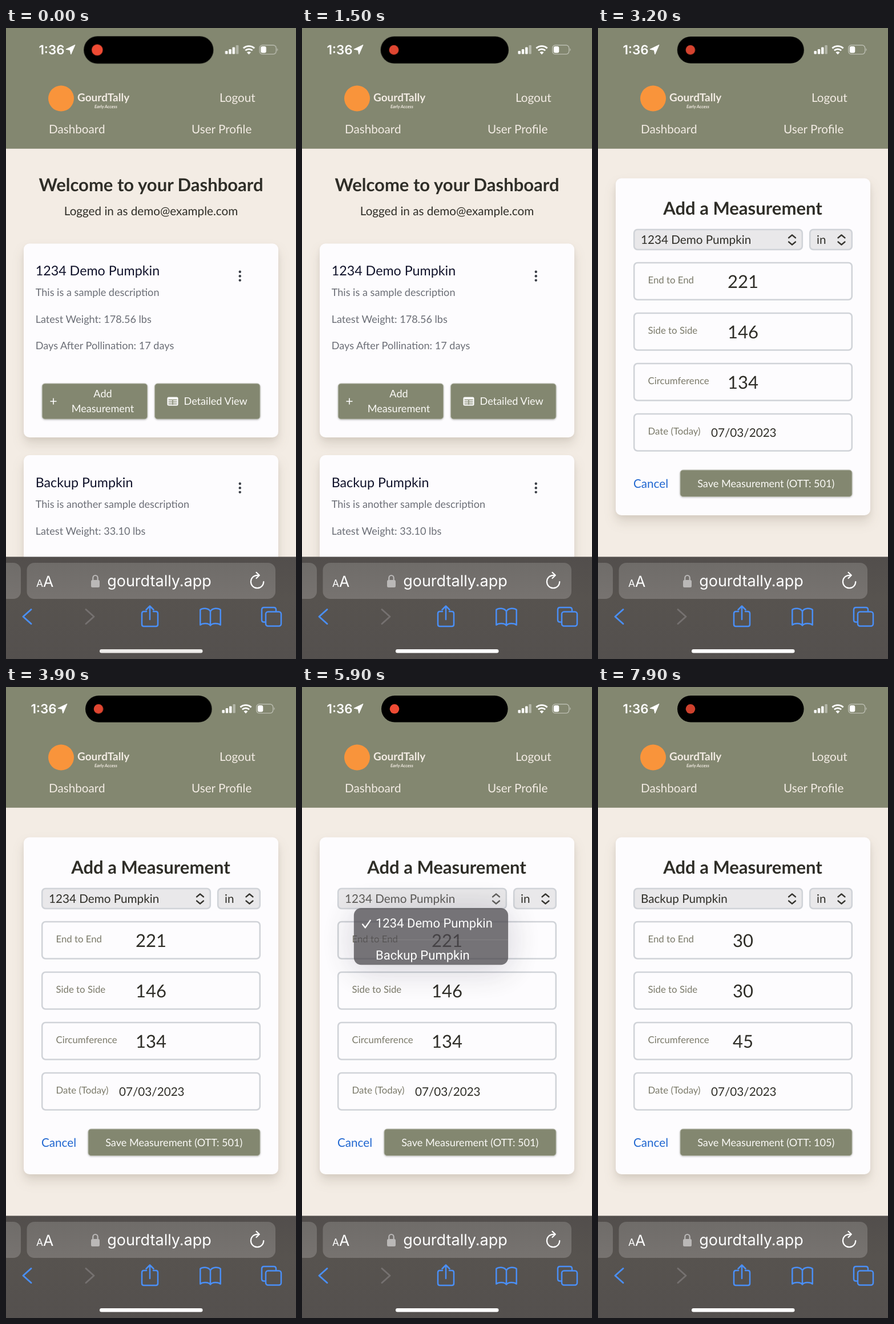
Animation of 508x1102 px, one loop 8 s. Source, as an HTML page:

```html
<!DOCTYPE html>
<html lang="en">
<head>
<meta charset="utf-8">
<title>Dashboard demo</title>
<style>
html, body { margin: 0; width: 100%; height: 100%; overflow: hidden; background: #f3ece4; }
.stage { position: relative; width: 508px; height: 1102px; overflow: hidden; text-rendering: geometricPrecision; }
svg { position: absolute; left: 0; top: 0; display: block; }
text { font-family: Lato, sans-serif; font-size: 20.68px; fill: #2f2e28; white-space: pre; text-rendering: geometricPrecision; }
.mid { text-anchor: middle; }
.h1 { font-size: 31.02px; font-weight: 700; }
.h2 { font-size: 23.27px; fill: #10122a; }
.sm { font-size: 18.1px; fill: #6b6e76; }
.label { font-size: 16.8px; fill: #7b7a6a; }
.num { font-size: 31.02px; text-anchor: middle; }
.nav { fill: #f3ece4; }
.btn { font-size: 18.1px; fill: #fbfaf6; }
.sys, .sys text { font-family: Inter, sans-serif; fill: #fff; }
.card { fill: #fdfcfe; filter: drop-shadow(0 12px 10px rgba(70,55,30,.13)) drop-shadow(0 3px 4px rgba(70,55,30,.06)); }
.key { fill: #838770; stroke: #b4b7a8; stroke-width: 1; filter: drop-shadow(0 1.5px 1.5px rgba(0,0,0,.24)); }
.field { fill: none; stroke: #d0d3d8; stroke-width: 2.6; }
.pick { fill: #e9e8ea; }
.line { fill: none; stroke-linecap: round; stroke-linejoin: round; }

/* every timeline shares one 8 s cycle */
.dash, .form, .old, .new, .row2, .clock, .icons, .island, .rec, .dot, .bar, .home, .menu, .sel {
  animation: 8s linear infinite;
}
.dash { animation-name: leave; animation-timing-function: step-end; }
.form { animation-name: enter; animation-timing-function: step-end; }
.old { animation-name: before; animation-timing-function: step-end; }
.new { animation-name: after; animation-timing-function: step-end; }
.row2 { animation-name: press; animation-timing-function: step-end; }
.clock { animation-name: clock; animation-timing-function: ease-out; }
.icons { animation-name: icons; animation-timing-function: ease-out; }
.island { animation-name: shrink; transform-origin: 249.8px 38.3px; }
.rec { animation-name: settle; animation-timing-function: ease-out; transform-origin: 162px 38.3px; }
.dot { animation-name: pulse; animation-timing-function: ease-in-out; }
.bar { animation-name: bar; }
.home { animation-name: home; }
.sel { animation-name: dim; }

@keyframes leave { 0% { opacity: 1 } 38.75%, 100% { opacity: 0 } }
@keyframes enter { 0% { opacity: 0 } 38.75%, 100% { opacity: 1 } }
@keyframes before { 0% { opacity: 1 } 86.25%, 100% { opacity: 0 } }
@keyframes after { 0% { opacity: 0 } 86.25%, 100% { opacity: 1 } }
@keyframes press { 0% { background: transparent } 81.25% { background: #6b696d } 85%, 100% { background: transparent } }
@keyframes clock { 0% { transform: translateX(14px) } 5%, 100% { transform: none } }
@keyframes icons { 0% { transform: translateX(5.5px) } 5%, 100% { transform: none } }
@keyframes shrink {
  0% { transform: scale(1.025) } 8.75% { transform: scale(1.017) }
  30% { transform: scale(1.006) } 44%, 100% { transform: none }
}
@keyframes settle { 0% { transform: scale(1.15) } 5%, 100% { transform: none } }
@keyframes pulse {
  0%, 15%, 30%, 45%, 60%, 75%, 90% { opacity: 1 }
  7.5%, 22.5%, 37.5%, 52.5%, 67.5%, 82.5%, 97.5%, 100% { opacity: .86 }
}
@keyframes bar { 0%, 2.4% { opacity: 0 } 3.75%, 13% { opacity: 1 } 17%, 100% { opacity: 0 } }
@keyframes home { 0% { fill: #eeecea } 4%, 100% { fill: #fff } }
@keyframes dim { 0%, 71.9% { opacity: 1 } 73.75%, 85% { opacity: .75 } 88%, 100% { opacity: 1 } }
@keyframes open {
  0%, 71.9% { transform: scale(.4); height: 60px; opacity: 0 }
  73.75% { transform: scale(.846); height: 117px; opacity: .8 }
  75% { transform: scale(.97); height: 128px; opacity: .96 }
  77%, 85% { transform: none; height: 130px; opacity: 1 }
  86.5% { transform: scale(.85); height: 112px; opacity: .6 }
  88.5%, 100% { transform: scale(.5); height: 70px; opacity: 0 }
}
.menu {
  position: absolute; left: 69px; top: 386px; width: 319px; height: 130px;
  border-radius: 15px; overflow: hidden; transform-origin: 143px 0;
  background: rgba(76,74,78,.965); box-shadow: 0 8px 70px rgba(30,25,45,.24);
  color: #fff; font: 26px/65px Roboto, sans-serif; animation-name: open;
}
.menu div { box-sizing: border-box; height: 65px; padding-left: 45px; white-space: nowrap; }
.menu .row2 { border-top: 1px solid rgba(255,255,255,.1); }
</style>
</head>
<body>
<div class="stage">
<svg width="508" height="1102" viewBox="0 0 508 1102">
  <defs>
    <linearGradient id="dock" x2="0" y2="1">
      <stop stop-color="#524e4c"/><stop offset=".4" stop-color="#57534f"/><stop offset="1" stop-color="#54504e"/>
    </linearGradient>
    <linearGradient id="glass" x2="0" y2="1">
      <stop stop-color="#6f6c69"/><stop offset="1" stop-color="#777370"/>
    </linearGradient>
    <g id="dots" fill="#3a3e46">
      <circle cx="409.8" cy="425.8" r="2.2"/><circle cx="409.8" cy="433.2" r="2.2"/><circle cx="409.8" cy="440.6" r="2.2"/>
    </g>
    <path id="sort" class="line" stroke="#35342f" stroke-width="2.3" d="M-6-3.5 0-8.5 6-3.5M-6 3.5 0 8.5 6 3.5"/>
    <rect id="box" class="field" x="63.2" y="410" width="381.6" height="64.5" rx="6"/>
  </defs>

  <rect width="508" height="1102" fill="#f3ece4"/>
  <rect width="508" height="210.8" fill="#838770"/>
  <circle cx="96.5" cy="123" r="22.5" fill="#f9943b"/>
  <text x="125" y="128" class="nav" style="font-size:19px;font-weight:700">GourdTally</text>
  <text x="155" y="140" class="nav" style="font-size:7.8px;font-weight:700;font-style:italic">Early Access</text>
  <text x="374" y="129" class="nav">Logout</text>
  <text x="75" y="183.5" class="nav">Dashboard</text>
  <text x="325" y="183.5" class="nav">User Profile</text>

  <g class="dash">
    <text x="254" y="284.5" class="h1 mid">Welcome to your Dashboard</text>
    <text x="254" y="327" class="mid">Logged in as demo@example.com</text>
    <rect class="card" x="31" y="376.5" width="446" height="338.5" rx="10"/>
    <text x="51.7" y="432" class="h2">1234 Demo Pumpkin</text>
    <use href="#dots"/>
    <text x="51.7" y="468" class="sm">This is a sample description</text>
    <text x="51.7" y="514.5" class="sm">Latest Weight: 178.56 lbs</text>
    <text x="51.7" y="561" class="sm">Days After Pollination: 17 days</text>
    <rect class="key" x="63.3" y="621" width="184.4" height="62" rx="5"/>
    <rect class="key" x="260.6" y="621" width="184.4" height="62" rx="5"/>
    <path d="M77.5 652h11M83 646.5v11" stroke="#fff" stroke-width="1.6"/>
    <text x="169.5" y="645" class="btn mid">Add</text>
    <text x="169.5" y="671" class="btn mid">Measurement</text>
    <rect x="282.5" y="644.5" width="19" height="15" rx="2.5" fill="#fff"/>
    <path d="M284.5 649.5h15M284.5 653h15M284.5 656.5h15M292 649v9" stroke="#838770" stroke-width="1.4"/>
    <text x="311.5" y="658" class="btn">Detailed View</text>

    <rect class="card" x="31" y="746" width="446" height="338" rx="10"/>
    <text x="51.7" y="802" class="h2">Backup Pumpkin</text>
    <use href="#dots" y="370"/>
    <text x="51.7" y="838" class="sm">This is another sample description</text>
    <text x="51.7" y="884.5" class="sm">Latest Weight: 33.10 lbs</text>
  </g>

  <g class="form">
    <rect class="card" x="31" y="262.5" width="446" height="588.5" rx="10"/>
    <text x="253.5" y="325.5" class="h1 mid">Add a Measurement</text>
    <rect class="field pick" x="63.2" y="352" width="294.6" height="35" rx="6"/>
    <rect class="field pick" x="371.2" y="352" width="73.6" height="35" rx="6"/>
    <g class="sel">
      <text x="75" y="377" class="old">1234 Demo Pumpkin</text>
      <text x="75" y="377" class="new">Backup Pumpkin</text>
      <use href="#sort" x="340" y="370"/>
    </g>
    <text x="383" y="377">in</text>
    <use href="#sort" x="426.5" y="370"/>
    <use href="#box"/><use href="#box" y="88"/><use href="#box" y="176"/><use href="#box" y="264"/>
    <text x="87.5" y="446" class="label">End to End</text>
    <text x="87.5" y="534" class="label">Side to Side</text>
    <text x="87.5" y="622" class="label">Circumference</text>
    <text x="87.5" y="710" class="label">Date (Today)</text>
    <text x="198" y="713.5">07/03/2023</text>
    <g class="old">
      <text x="254" y="454" class="num">221</text>
      <text x="254" y="542" class="num">146</text>
      <text x="254" y="630" class="num">134</text>
    </g>
    <g class="new">
      <text x="254" y="454" class="num">30</text>
      <text x="254" y="542" class="num">30</text>
      <text x="254" y="630" class="num">45</text>
    </g>
    <text x="62" y="803" style="fill:#1f66d0">Cancel</text>
    <rect class="key" x="144" y="772" width="301" height="46.5" rx="5"/>
    <text x="294.3" y="802" class="btn mid old">Save Measurement (OTT: 501)</text>
    <text x="294.3" y="802" class="btn mid new">Save Measurement (OTT: 105)</text>
  </g>

  <rect class="bar" x="500.6" y="80" width="4" height="666" rx="2" fill="#000" fill-opacity=".48"/>

  <!-- status bar -->
  <g class="sys clock">
    <text x="43.5" y="46" style="font-size:22.3px;font-weight:600">1:36</text>
    <path d="M107 29.5 99.8 46 98.2 38.6 91 37.2Z" stroke="#fff" stroke-linejoin="round"/>
  </g>
  <g class="icons" fill="#fff">
    <rect x="378.5" y="40" width="4.4" height="5.5" rx="1.2"/>
    <rect x="384.8" y="37" width="4.4" height="8.5" rx="1.2"/>
    <rect x="391.1" y="33.5" width="4.4" height="12" rx="1.2"/>
    <rect x="397.4" y="30" width="4.4" height="15.5" rx="1.2" opacity=".4"/>
    <path d="M410.4 35.4a14.2 14.2 0 0 1 19.2 0M413.9 39.3a9 9 0 0 1 12.2 0" fill="none" stroke="#fff" stroke-width="2.9"/>
    <path d="M416.5 42.6a5 5 0 0 1 7 0L420 46.2Z"/>
    <rect x="438.7" y="30" width="29" height="15.6" rx="5" fill="none" stroke="#fff" stroke-opacity=".45" stroke-width="1.4"/>
    <path d="M469.4 35.2q2.4 2.6 0 5.2Z" opacity=".5"/>
    <rect x="440.8" y="32" width="9.5" height="11.6" rx="3"/>
  </g>
  <g class="island">
    <rect x="139" y="15" width="221.6" height="46.6" rx="23.3"/>
    <g class="rec"><circle class="dot" cx="162" cy="38.3" r="8.3" fill="#f04c35"/></g>
  </g>

  <!-- browser dock -->
  <rect y="923.5" width="508" height="179" fill="url(#dock)"/>
  <g fill="url(#glass)">
    <rect x="-40" y="934" width="66" height="63" rx="13"/>
    <rect x="36.5" y="934" width="435.5" height="63" rx="13"/>
  </g>
  <g class="sys">
    <text x="53" y="975.5" style="font-size:17.5px">A</text>
    <text x="65" y="975.5" style="font-size:26.5px">A</text>
    <text x="268.5" y="975" class="mid" style="font-size:27px">gourdtally.app</text>
  </g>
  <rect x="149" y="964" width="15" height="13" rx="2.5" fill="#bab8b7"/>
  <path d="M152.3 965v-4.4a4.2 4.6 0 0 1 8.4 0v4.4" fill="none" stroke="#bab8b7" stroke-width="2.2"/>
  <g class="line" stroke="#fff" stroke-width="2.2">
    <path d="M451.3 967a11.2 11.2 0 1 1-11.2-11.2h3"/>
    <path d="M438.5 950.8 443.8 955.8 438.5 961"/>
  </g>
  <g class="line" stroke="#4a8ff7" stroke-width="2.5">
    <path d="M44 1015.5 30 1028 44 1040.5" stroke-width="3"/>
    <path d="M140 1015.5 154 1028 140 1040.5" stroke="#757170" stroke-width="3"/>
    <path d="M246 1019h-4.5q-3.5 0-3.5 3.5v19q0 3.5 3.5 3.5h21q3.5 0 3.5-3.5v-19q0-3.5-3.5-3.5H258M252 1033V1010M245.5 1016 252 1009.5 258.5 1016"/>
    <path d="M358 1019c-3-6.5-14-6.5-17.7-3v26.5c4-3.5 14.700-3.500 17.700 1c3-4.500 13.700-4.500 17.700-1v-26.500c-3.700-3.500-14.700-3.500-17.700 3v24.500"/>
    <path d="M454 1037.5h-2q-4 0-4-4V1016q0-4 4-4h17q4 0 4 4v2.5"/>
    <rect x="455" y="1019.5" width="27" height="25" rx="4"/>
  </g>
  <rect class="home" x="164" y="1085" width="180.5" height="6.6" rx="3.3" fill="#fff"/>
</svg>

<div class="menu">
  <svg width="40" height="65"><path class="line" d="M18 33.5 23.5 40.5 34 25.5" stroke="#fff" stroke-width="2.8"/></svg>
  <div>1234 Demo Pumpkin</div>
  <div class="row2">Backup Pumpkin</div>
</div>
</div>
</body>
</html>
```
